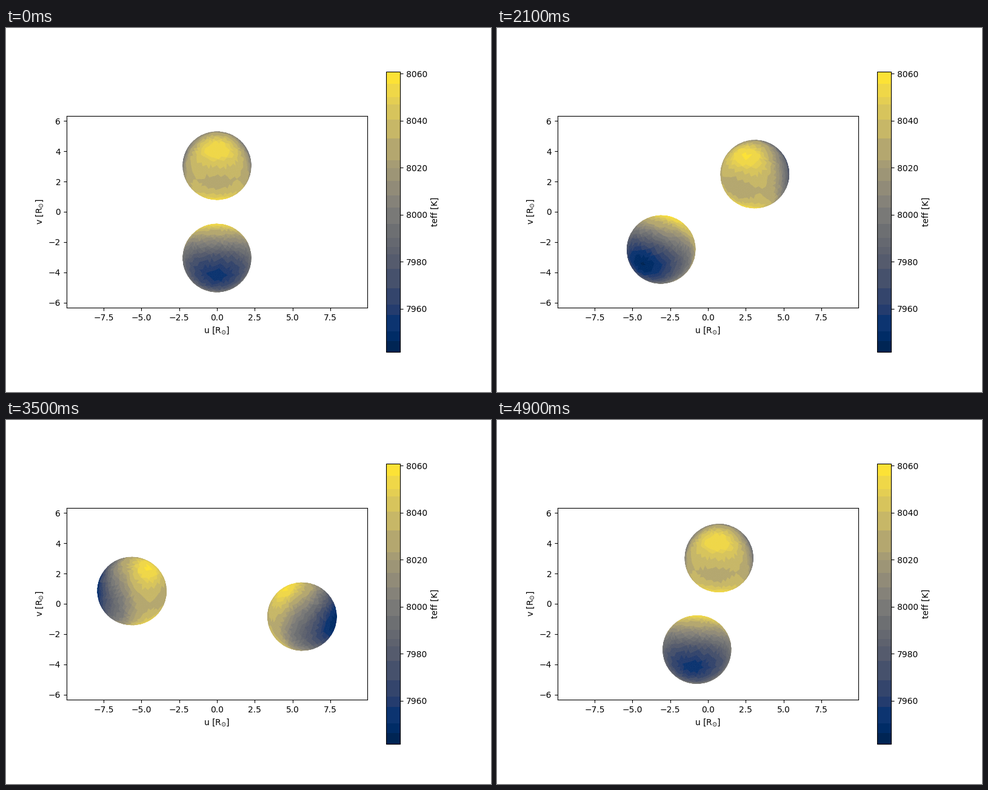
Animation, 800 px wide and 600 px high, one loop 5 s. Source, as a matplotlib script:

```python
import numpy as np
import matplotlib.pyplot as plt
from matplotlib.animation import FuncAnimation
from matplotlib.cm import ScalarMappable
from matplotlib.collections import PolyCollection
from matplotlib.colors import ListedColormap, Normalize
from matplotlib.tri import Triangulation

FRAMES, INTERVAL = 50, 100
SEMI_AXIS, ECC = 5.965, 0.0245      # orbit of each star around the barycentre
APASTRON = np.radians(20)           # mean anomaly of apastron after conjunction
INCL = np.radians(60)
RADIUS, BULGE = 2.25, 0.0075
T_MIN, T_MAX = 7941.6, 8060.8


def banded_cividis(n=256):
    """Cividis reduced to a few flat bands of uneven height."""
    edges = np.array([0, 20, 41, 55, 80, 110, 147, 158, 181, 204, 224, 251,
                      274, 288, 302, 325, 357, 385, 401, 428, 444, 462])
    edges = 1 - edges[::-1] / 462
    edges.sort()
    centres = (edges[:-1] + edges[1:]) / 2
    band = np.searchsorted(edges, (np.arange(n) + 0.5) / n) - 1
    return ListedColormap(plt.get_cmap("cividis")(centres[band]))


def sphere_mesh(n=760):
    """Unit vertices and triangles: Delaunay on a stereographic projection."""
    k = np.arange(n) + 0.5
    z = 1 - 2 * k / n
    phi = np.pi * (1 + 5 ** 0.5) * k
    rng = np.random.default_rng(4)
    z = np.clip(z + rng.normal(0, 0.004, n), -0.9995, 0.9995)
    phi = phi + rng.normal(0, 0.006, n) / np.sqrt(1 - z ** 2)
    rho = np.sqrt(1 - z ** 2)
    x, y = rho * np.cos(phi), rho * np.sin(phi)
    tri = Triangulation(x / (1 + z), y / (1 + z)).triangles
    return np.column_stack([x, y, z]), tri


def orbit(frame):
    """Angle since conjunction and distance from the barycentre."""
    def true_anomaly(mean):
        m = mean - APASTRON + np.pi
        return m + 2 * ECC * np.sin(m) + 1.25 * ECC ** 2 * np.sin(2 * m)

    nu = true_anomaly(2 * np.pi * frame / FRAMES)
    dist = SEMI_AXIS * (1 - ECC ** 2) / (1 + ECC * np.cos(nu))
    return nu - true_anomaly(0), dist


def temperature(normals, closeness):
    """Gravity darkening plus heating by the companion (along +x)."""
    x, y, _ = normals.T
    tide = closeness ** 3
    p3 = (5 * x ** 3 - 3 * x) / 2
    lit = (x + np.sqrt(x ** 2 + 0.04)) / 2
    return (8029 - 85 * tide * x ** 2 - 38 * y ** 2
            - 5 * tide * p3 + 88 * closeness ** 2 * lit)


def to_sky(p):
    """Orbital frame to (u, v, towards the observer)."""
    x, y, z = p[..., 0], p[..., 1], p[..., 2]
    return np.stack([x, y * np.cos(INCL) + z * np.sin(INCL),
                     z * np.cos(INCL) - y * np.sin(INCL)], axis=-1)


VERTS, TRIS = sphere_mesh()
CENTRES = VERTS[TRIS].mean(axis=1)
CENTRES /= np.linalg.norm(CENTRES, axis=1)[:, None]


def star(angle, dist):
    """Visible triangles of one star and their temperatures."""
    closeness = SEMI_AXIS / dist
    pos = dist * np.array([-np.sin(angle), np.cos(angle), 0])
    ax_x = -pos / dist
    ax_z = np.array([0, 0, 1.0])
    basis = np.array([ax_x, np.cross(ax_z, ax_x), ax_z])

    x, z = VERTS[:, 0], VERTS[:, 2]
    swell = closeness ** 3 * (1.5 * x ** 2 - 0.5) + 1 - z ** 2
    shape = VERTS * (RADIUS * (1 + BULGE * swell))[:, None]
    tris = to_sky(shape @ basis + pos)[TRIS]
    front = to_sky(CENTRES @ basis)[:, 2] > 0
    return tris[front, :, :2], temperature(CENTRES[front], closeness)


cmap = banded_cividis()
norm = Normalize(T_MIN, T_MAX)

fig, ax = plt.subplots(figsize=(8, 6), dpi=100)
ax.set_aspect("equal")
ax.set_xlim(-9.95, 9.95)
ax.set_ylim(-6.335, 6.335)
ax.set_xlabel(r"u [$\mathrm{R_{\odot}}$]")
ax.set_ylabel(r"v [$\mathrm{R_{\odot}}$]")
fig.colorbar(ScalarMappable(norm, cmap), ax=ax, label="teff [K]")

stars = [ax.add_collection(PolyCollection([], cmap=cmap, norm=norm,
                                          edgecolors="face", linewidths=0.5),
                           autolim=False)
         for _ in range(2)]


def update(frame):
    angle, dist = orbit(frame)
    for i, coll in enumerate(stars):
        polys, teff = star(angle + i * np.pi, dist)
        coll.set_verts(polys)
        coll.set_array(teff)
    return stars


anim = FuncAnimation(fig, update, frames=FRAMES, interval=INTERVAL,
                     repeat=True, repeat_delay=0)
plt.show()
```
